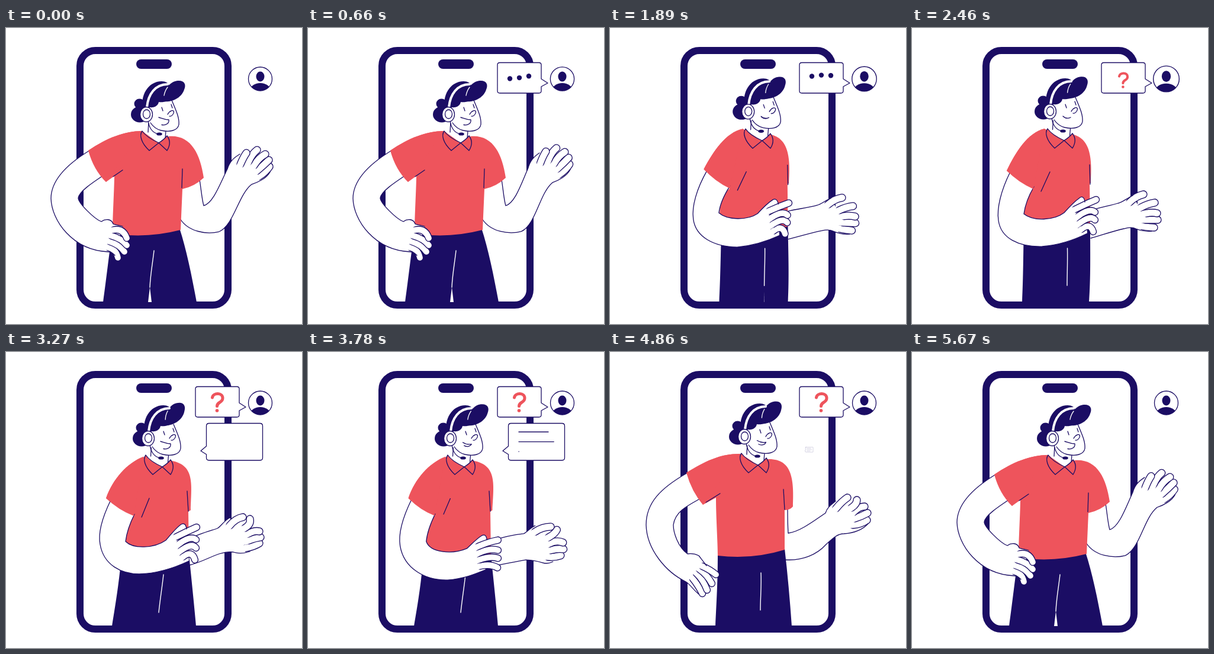
Recreate the animation shown at these times as an HTML page with a canvas. Size 500 by 500 pixels, loop 5700 ms.

```html
<!DOCTYPE html>
<html lang="en">
<head>
<meta charset="utf-8">
<title>Support call</title>
<style>
html, body { margin: 0; width: 100%; height: 100%; overflow: hidden; background: #fff; }
canvas { display: block; width: 500px; height: 500px; }
</style>
</head>
<body>
<canvas id="stage"></canvas>
<script>
const LOOP = 5700, NAVY = '#1b0d64', RED = '#ee545c', WHITE = '#fff', LINE = 1.3;
const canvas = document.getElementById('stage');
const ctx = canvas.getContext('2d');
const ratio = window.devicePixelRatio || 1;
canvas.width = canvas.height = 500 * ratio;

// Each pose uses the same path commands, so any two can be blended.
const greet = {
  shirt: 'M230 174C200 174 170 186 139 207Q148 240 169 260L183 250C183 270 180 320 180 347Q237 356 295 341L298 272Q318 268 334 253C328 212 312 180 275 183L258 194',
  creases: 'M181 251L197 240M298 238L297 270',
  legs: 'M180 342C173 390 170 420 164 463L322 463C313 415 305 375 293 338',
  seam: 'M250 376C248 395 244 415 243 438',
  gap: 'M240 463L243 438L246 463',
  armL: 'M141 207C100 232 76 258 76 288C77 325 112 375 172 378C176 378 180 380 184 384',
  armLin: 'M197 335C190 333 186 333 181 331C178 322 168 322 161 327C150 323 122 296 122 287C124 276 145 262 163 250',
  handL: 'M182 341Q198 338 204 355M178 351Q196 356 204 367M176 361Q192 366 200 378M174 371Q186 374 189 388',
  armR: 'M294 322C308 345 340 349 360 344C385 333 392 282 415 264C425 261 440 254 446 243',
  armRin: 'M395 213C385 219 378 225 374 238C362 262 350 296 334 300C331 290 330 275 327 256',
  handR: 'M396 230Q401 218 406 211M410 225Q416 212 424 206M419 232Q427 219 438 213M424 241Q435 232 444 223M428 250Q438 244 445 234',
  head: '0 0 0 1', collar: '0 0'
};
const wait = {
  shirt: 'M230 175C198 174 170 186 137 205Q145 238 165 258L182 248C182 270 180 320 180 345Q237 357 294 341L297 275Q302 275 305 271C309 235 315 190 275 184L258 194',
  creases: 'M179 249L193 240M297 238L296 273',
  legs: 'M180 342C172 390 168 420 163 463L322 463C313 415 305 375 293 338',
  seam: 'M250 376C247 395 243 415 242 438',
  gap: 'M239 463L242 440L245 463',
  armL: 'M139 205C95 228 68 255 69 290C70 322 111 365 145 384C149 386 152 390 151 399',
  armLin: 'M180 345C172 341 166 338 161 336C155 332 150 332 145 333C130 322 115 302 115 290C116 270 140 258 158 248',
  handL: 'M173 350Q181 358 181 372M165 355Q175 368 175 385M159 364Q168 376 168 392M151 375Q158 384 156 398',
  armR: 'M296 378C315 381 340 383 355 387C365 390 370 398 378 405C386 410 395 414 402 417',
  armRin: 'M378 346C370 345 366 347 364 347C340 345 315 342 294 328C294 327 294 326 294 325',
  handR: 'M378 352Q393 354 406 363M394 372Q406 373 417 380M389 382Q404 386 416 393M385 390Q398 397 410 405M381 398Q392 406 402 411',
  head: '-1 0 -12 1', collar: '-1 0'
};
const listen = {
  shirt: 'M224 170C195 177 175 210 160 241Q180 261 205 272L190 284C186 300 185 315 185 330Q250 345 301 335L300 262Q301 262 302 262C303 235 307 188 272 180L256 190',
  creases: 'M218 276L233 243M300 231L301 264',
  legs: 'M189 327C188 385 188 420 186 463L299 463C302 420 301 385 301 332',
  seam: 'M262.500 372C263 395 262 415 262 435',
  gap: 'M262 463L262 445L262 463',
  armL: 'M166 243C150 275 143 305 146 325C150 355 180 370 220 369C255 366 280 355 296 347',
  armLin: 'M292 294C291 285 287 284 283 287C276 292 266 302 257 312C240 325 205 327 189 314C191 299 196 285 206 268',
  handL: 'M276 306Q294 297 311 290M282 317Q300 304 309 311M284 329Q302 316 309 324M286 340Q301 328 306 344',
  armR: 'M302 355C320 350 340 343 358 339C365 337 372 336 378 339C385 342 395 344 405 343',
  armRin: 'M373 283C362 288 355 295 348 296C335 300 318 303 306 307C302 308 300 309 298 310',
  handR: 'M368 294Q378 284 391 281M387 303Q398 297 410 295M396 313Q406 311 414 313M394 324Q406 324 415 324M390 335Q402 337 409 337',
  head: '-4 -5 -4 0', collar: '-1 -4'
};
const speak = {
  shirt: 'M232 177C205 187 180 215 169 247Q190 267 216 277L205 286C196 305 195 315 195 332Q255 355 309 345L308 269Q310 269 312 267C313 225 320 192 281 184L264 194',
  creases: 'M229 279L242 247M306 235L308 269',
  legs: 'M196 335C191 390 186 420 179 463L321 463C318 430 314 390 309 342',
  seam: 'M266 376C264 395 260 420 258 440',
  gap: 'M258 463L258 445L258 463',
  armL: 'M177 250C160 285 156 310 159 325C165 360 195 375 225 375C260 374 290 362 309 353',
  armLin: 'M305 299C304 290 300 289 296 291C288 296 278 309 270 318C250 332 215 333 202 320C204 303 209 290 217 274',
  handL: 'M288 312Q306 303 322 296M294 323Q312 310 321 317M296 335Q314 322 321 331M299 346Q314 334 319 351',
  armR: 'M310 360C330 355 345 346 360 341C370 338 378 337 384 338C390 340 400 341 412 337',
  armRin: 'M378 280C368 285 362 296 357 298C345 302 325 307 312 315C309 316 308 316 306 317',
  handR: 'M378 293Q388 281 400 279M404 297Q414 291 412 282M409 307Q420 301 428 303M411 318Q422 314 430 313M406 331Q418 329 428 323',
  head: '3 0 -8 1', collar: '6 0'
};
const settle = {
  shirt: 'M232 177C205 187 180 215 170 247Q190 268 212 276L199 288C190 305 188 315 188 325Q250 365 309 350L308 269Q310 269 311 267C314 225 320 192 281 184L264 194',
  creases: 'M229 270L239 248M306 235L308 269',
  legs: 'M193 365C190 400 185 430 179 463L321 463C318 430 314 390 309 345',
  seam: 'M266 376C264 395 260 420 258 440',
  gap: 'M258 463L258 445L258 463',
  armL: 'M174 247C155 285 150 310 153 330C160 370 200 395 245 393C265 391 280 384 292 380',
  armLin: 'M300 332C299 324 296 323 292 325C284 329 275 337 267 343C240 350 200 345 198 320C199 305 205 290 213 273',
  handL: 'M288 341Q304 335 320 335M286 352Q304 348 321 349M286 363Q304 362 321 362M284 374Q304 376 321 375',
  armR: 'M311 364C335 360 355 360 375 359C385 362 395 366 405 370C408 371 412 371 415 368',
  armRin: 'M388 304C378 309 374 313 370 314C350 314 330 318 309 322C308 322 307 322 306 322',
  handR: 'M388 312Q402 307 418 308M408 326Q420 320 427 315M406 337Q420 330 433 337M409 348Q422 346 433 349M405 358Q414 362 426 360',
  head: '3 0 3 0', collar: '6 0'
};
const finish = {
  shirt: 'M220 172C185 172 160 185 129 204Q138 236 157 258L179 246C179 280 182 320 182 344Q240 351 295 334L295 267Q304 267 309 261C311 215 308 180 267 181L250 190',
  creases: 'M162 254L186 239M293 232L295 266',
  legs: 'M182 341C182 390 180 420 178 463L307 463C304 420 300 375 295 332',
  seam: 'M255 373C256 395 254 415 254 436',
  gap: 'M254 463L254 445L254 463',
  armL: 'M131 204C85 230 61 255 61 292C62 334 95 372 128 388C135 392 142 403 150 409',
  armLin: 'M163 361C157 353 153 348 150 344C144 341 138 340 131 341C115 330 107 305 107 292C110 270 130 260 150 249',
  handL: 'M156 362Q168 367 179 376M151 367Q164 376 172 391M146 374Q157 384 164 402M140 383Q149 394 156 408',
  armR: 'M296 351C325 353 350 342 365 325C378 313 385 307 395 307C410 306 425 302 436 290',
  armRin: 'M381 252C372 259 366 264 364 272C345 285 320 304 301 306C300 290 300 280 300 262',
  handR: 'M382 264Q392 252 401 246M408 263Q417 257 417 250M412 270Q421 261 430 261M414 281Q426 277 435 272M410 292Q424 291 434 284',
  head: '-10 -3 -6 .5', collar: '-8 -3'
};
const poses = [greet, wait, listen, speak, settle, finish, greet];

// [time, position along the pose list]
const track = [[0, 0], [720, 0], [1320, 1], [1400, 1.02], [1840, 1.93], [2160, 2], [2460, 2],
  [2980, 3.2], [3270, 3], [3600, 3.1], [3960, 4], [4240, 4], [4830, 5], [5120, 5], [5640, 6], [LOOP, 6]];

const clamp = v => Math.max(0, Math.min(1, v));
const span = (t, a, b) => clamp((t - a) / (b - a));
const smooth = p => p < .5 ? 4 * p ** 3 : 1 - 4 * (1 - p) ** 3;
const backOut = p => 1 + 2.7 * (p - 1) ** 3 + 1.7 * (p - 1) ** 2;
const pop = (t, a, b, c, d) => t < c ? backOut(span(t, a, b)) : backOut(1 - span(t, c, d));

const number = /-?\d*\.?\d+/g;
const numbers = s => s.match(number).map(Number);
function blend(a, b, k) {
  const ends = numbers(b);
  let i = 0;
  return a.replace(number, v => (+v + (ends[i++] - v) * k).toFixed(2));
}

function poseAt(t) {
  const n = Math.max(1, track.findIndex(key => key[0] > t));
  const [t0, p0] = track[n - 1], [t1, p1] = track[n];
  const p = p0 + (p1 - p0) * smooth(span(t, t0, t1));
  const i = Math.min(poses.length - 2, Math.floor(p));
  const pose = {};
  for (const part in greet) pose[part] = blend(poses[i][part], poses[i + 1][part], p - i);
  return pose;
}

// Turns the forearm about the elbow; the shoulder end stays put.
function swing(path, angle) {
  return path.replace(/(-?[\d.]+) (-?[\d.]+)/g, (_, x, y) => {
    const a = angle * clamp((x - 330) / 60), dx = x - 340, dy = y - 320;
    const c = Math.cos(a), s = Math.sin(a);
    return (340 + dx * c - dy * s).toFixed(2) + ' ' + (320 + dx * s + dy * c).toFixed(2);
  });
}

const fill = (path, color) => { ctx.fillStyle = color; ctx.fill(new Path2D(path)); };
function stroke(path, color = NAVY, width = LINE) {
  ctx.strokeStyle = color;
  ctx.lineWidth = width;
  ctx.stroke(new Path2D(path));
}
function ellipse(x, y, rx, ry, color, outlined) {
  ctx.beginPath();
  ctx.ellipse(x, y, rx, ry, 0, 0, 7);
  ctx.fillStyle = color;
  ctx.fill();
  if (outlined) { ctx.strokeStyle = NAVY; ctx.lineWidth = LINE; ctx.stroke(); }
}
function box(x, y, w, h, r) {
  ctx.beginPath();
  ctx.roundRect(x, y, w, h, r);
}
function group(draw, x = 0, y = 0, scale = 1, cx = 0, cy = 0, turn = 0) {
  ctx.save();
  ctx.translate(x + cx, y + cy);
  ctx.rotate(turn * Math.PI / 180);
  ctx.scale(scale, scale);
  ctx.translate(-cx, -cy);
  draw();
  ctx.restore();
}

function drawFinger([bx, by, mx, my, tx, ty], width) {
  const d = Math.hypot(bx - mx, by - my) || 1;
  const ex = bx + (bx - mx) / d * 7, ey = by + (by - my) / d * 7;
  const curve = `Q${mx} ${my} ${tx} ${ty}`;
  stroke(`M${bx} ${by}${curve}`, NAVY, width + LINE);
  stroke(`M${ex} ${ey}L${bx} ${by}${curve}`, WHITE, width - LINE);
}
function drawArm(outer, inner, hand, width) {
  fill(outer + inner.replace('M', 'L') + 'Z', WHITE);
  const n = numbers(hand);
  for (let i = n.length - 6; i >= 0; i -= 6) drawFinger(n.slice(i, i + 6), width);
  stroke(outer);
  stroke(inner);
}

function drawPhone() {
  ctx.strokeStyle = ctx.fillStyle = NAVY;
  ctx.lineWidth = 12;
  box(125, 38, 250, 430, 26);
  ctx.stroke();
  box(220, 53, 60, 16, 8);
  ctx.fill();
}

function drawHead(quiffTurn, open) {
  ellipse(225.5, 128, 9, 8.5, NAVY);
  ellipse(226, 146, 15, 13.5, NAVY);
  fill('M236 130L283 120C288 135 293 150 292 163C290 174 276 176 262 173C252 170 244 164 238 156Z', WHITE);
  stroke('M280 122C286 137 293 150 292 163C290 174 276 176 262 173C254 171 248 166 244 160');
  fill('M231 140C226 114 240 90 263 90C270 90 274 93 276 97L280 118C274 124 266 126 258 125C257 131 251 135 243 134Z', NAVY);
  group(() => {
    fill('M265 124C266 108 275 90 290 89C301 88 305 95 301 104C297 117 282 126 265 124Z', NAVY);
    stroke('M267 114C268 108 270 104 273 100', WHITE);
  }, 0, 0, 1, 268, 120, quiffTurn);
  stroke('M238 134C240 112 252 95 273 95', WHITE, 4);
  stroke('M263 134L265 140M279 129L281 135');
  stroke('M273 146C276 140 283 137 283.500 142C283 146 279 150 276 149');
  const mouth = blend('M259 154C263 158 268 158 272 156C268 158 263 158 259 154',
    'M258 151C262 152 267 155 275 155C276 161 270 165 263 163.500C256 161 254 151 258 151', open);
  stroke(mouth);
  stroke('M240 157C242 170 248 177 257 179');
  ellipse(259, 179, 4.8, 2.6, NAVY);
  ellipse(237, 146, 10.5, 12.5, WHITE, true);
  ellipse(237.5, 145.5, 6, 7.5, WHITE, true);
}

function drawPerson(t) {
  const p = poseAt(t);
  const [hx, hy, quiff, open] = numbers(p.head);
  const [cx, cy] = numbers(p.collar);
  const s = t > 5000 ? t - LOOP : t;
  const angle = .131 * Math.sin(s * Math.PI * 2 / 1180) * span(s, -300, -100) * (1 - span(s, 600, 880));

  drawArm(swing(p.armR, angle), swing(p.armRin, angle), swing(p.handR, angle), 12);
  fill(p.legs + 'Z', NAVY);
  fill(p.gap + 'Z', WHITE);
  stroke(p.seam, WHITE, 1.4);
  fill(p.shirt + 'Z', RED);
  drawArm(p.armL, p.armLin, p.handL, 11);
  fill(p.shirt.split('L')[0] + 'Z', RED);
  stroke(p.creases);

  group(() => {
    fill('M241 150L270 160L270 184L258 194L234 177L240 174Z', WHITE);
    stroke('M241 158L240 176M270 174L269 186');
  }, (hx + cx) / 2, (hy + cy) / 2);
  group(() => {
    const collar = 'M230 174C225 181 228 194 242 207L258 194C247 189 236 183 230 174ZM258 194L272 207C277 199 278 190 272 182C268 187 263 191 258 194Z';
    fill(collar, RED);
    stroke(collar);
  }, cx, cy);
  group(() => drawHead(quiff, open), hx, hy);
}

function drawAvatar(t) {
  const beat = t > 600 && t < 2760 ? .05 * (1 - Math.cos((t - 600) / 720 * Math.PI * 2)) : 0;
  group(() => {
    ellipse(429.5, 86, 20, 20, WHITE, true);
    ctx.save();
    ctx.clip();
    ellipse(429.5, 106, 17.5, 13, NAVY);
    ctx.restore();
    ellipse(429.5, 82, 7, 8.5, NAVY);
  }, 0, 0, 1 + beat, 429.5, 86);
}

function drawQuestion(t) {
  const scale = pop(t, 150, 450, 5000, 5300);
  if (scale <= 0) return;
  group(() => {
    const shape = 'M324 58.500H390Q394 58.500 394 62.500V86L405 93L394 99V106Q394 110 390 110H324Q320 110 320 106V62.500Q320 58.500 324 58.500Z';
    fill(shape, WHITE);
    stroke(shape);
    const dot = 4.2 * (1 - span(t, 2160, 2260));
    for (let i = 0; dot > 0 && i < 3; i++) {
      ellipse(341 + i * 16, 82.5 + 3 * Math.sin((t - 1320) / 115 + 1 - i), dot, dot, NAVY);
    }
    const size = smooth(span(t, 2260, 2576));
    if (size > 0) group(() => {
      stroke('M348.500 77C350 68.500 366 68 366 78C366 86 356.500 84 356.500 91.500', RED, 5);
      ellipse(356.5, 99, 2.8, 2.8, RED);
    }, 0, 0, size, 356, 101);
  }, 0, 0, scale, 405, 93);
}

function drawReply(t) {
  const scale = pop(t, 3010, 3260, 4600, 4869);
  if (scale <= 0) return;
  group(() => {
    const shape = 'M343 120.500H429Q433.500 120.500 433.500 125V178.500Q433.500 183 429 183H343Q338.500 183 338.500 178.500V173L329 167L338.500 159V125Q338.500 120.500 343 120.500Z';
    fill(shape, WHITE);
    stroke(shape);
    [50, 60, 40].forEach((length, i) => {
      const k = smooth(span(t, 3350 + i * 200, 3620 + i * 200));
      const y = 135 + i * 16.6;
      if (k > 0) stroke(`M356 ${y}H${356 + length * k}`);
    });
  }, 0, 0, scale, 329, 167);
}

function draw(now) {
  const t = now % LOOP;
  ctx.setTransform(ratio, 0, 0, ratio, 0, 0);
  ctx.fillStyle = WHITE;
  ctx.fillRect(0, 0, 500, 500);
  ctx.lineCap = ctx.lineJoin = 'round';
  drawPhone();
  drawPerson(t);
  drawQuestion(t);
  drawReply(t);
  drawAvatar(t);
}

const start = performance.now();
function tick() {
  draw(performance.now() - start);
  requestAnimationFrame(tick);
}
tick();
</script>
</body>
</html>
```
